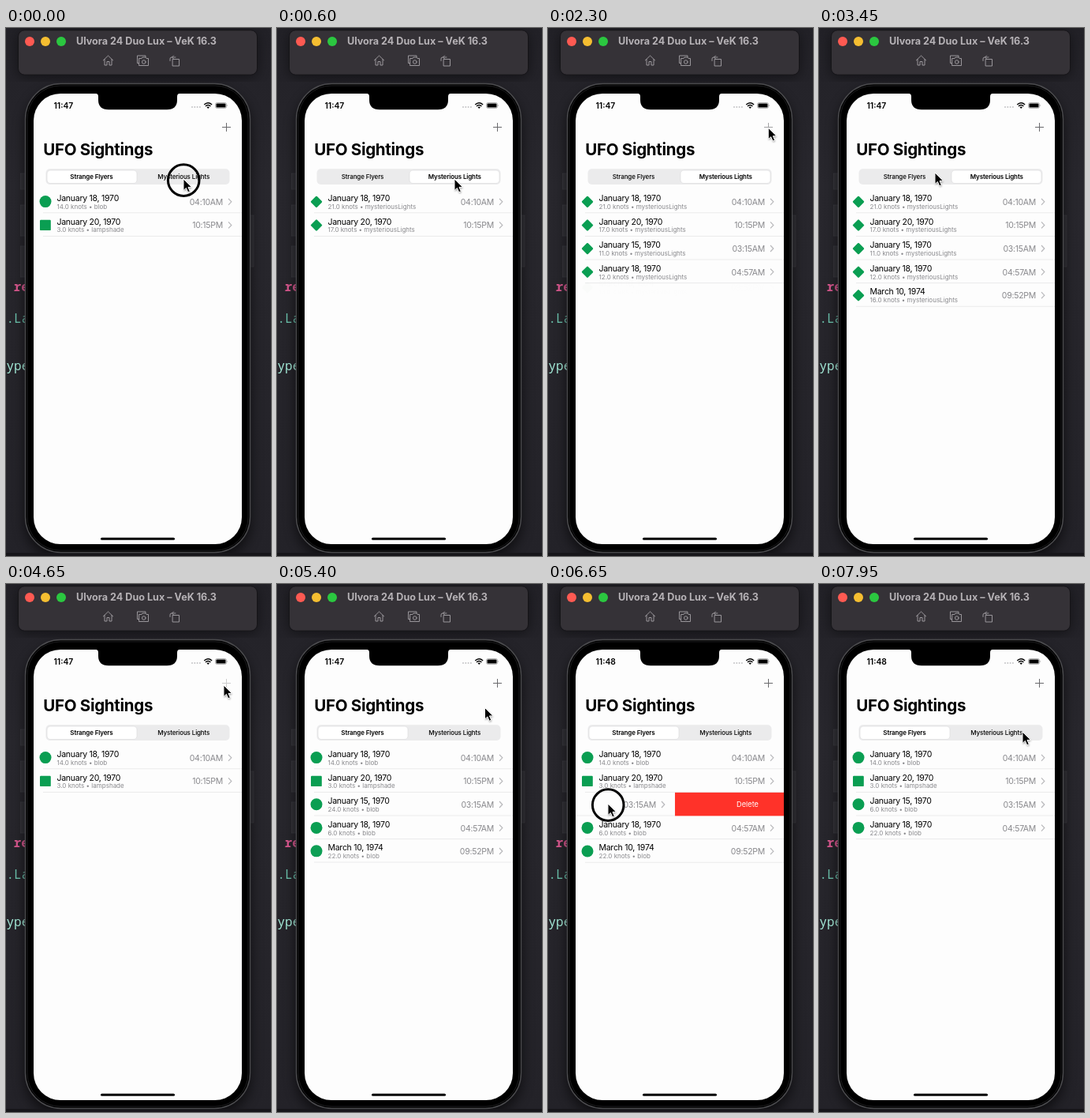
An HTML page for the animation above (8 s loop, 336x668 px).

```html
<!DOCTYPE html>
<html lang="en">
<head>
<meta charset="utf-8">
<title>UFO Sightings</title>
<style>
  html, body { margin: 0; width: 100%; height: 100%; overflow: hidden; background: #25242a; }
  svg { display: block; width: 100%; height: 100%; }
  text { font-family: Inter, Roboto, sans-serif; }
  .code text { font: 500 16px "Noto Sans Mono", "DejaVu Sans Mono", monospace; }
  .code .keyword { font-weight: 700; }
  .icons { fill: none; stroke: #a5a2a6; stroke-width: .9; stroke-linejoin: round; stroke-linecap: round; }
  .body { font-size: 10.5px; letter-spacing: -.26px; }
  .grey { fill: #88888c; }
  .note { font-size: 8px; }
  .tab { font-size: 8px; letter-spacing: -.13px; font-weight: 500; text-anchor: middle; }
  .tab.on { font-weight: 600; }
</style>
</head>
<body>
<svg viewBox="0 0 336 668">
  <defs>
    <linearGradient id="desk" x2="0" y2="1">
      <stop offset="0" stop-color="#222127"/>
      <stop offset=".3" stop-color="#28272d"/>
      <stop offset="1" stop-color="#232228"/>
    </linearGradient>
    <clipPath id="screen"><rect x="35" y="83" width="264" height="570" rx="34"/></clipPath>
    <filter id="blur" x="-20%" width="140%"><feGaussianBlur stdDeviation="8"/></filter>
    <filter id="soft" x="-50%" y="-50%" width="200%" height="200%"><feGaussianBlur stdDeviation="1.200"/></filter>
  </defs>

  <rect width="336" height="668" fill="url(#desk)"/>
  <g fill="#323137" stroke="#3d3c42" stroke-width=".7">
    <rect x="18.500" y="184" width="20" height="20"/>
    <rect x="18.500" y="224" width="20" height="39"/>
    <rect x="18.500" y="276" width="20" height="39"/>
    <rect x="290" y="237" width="24" height="65"/>
  </g>
  <g class="code">
    <text class="keyword" x="9.700" y="333" fill="#d9588f">re</text>
    <text x=".5" y="373" fill="#6cc3ad">.La</text>
    <text x=".5" y="433" fill="#a6eedb">ype</text>
  </g>
  <rect x="24" y="78" width="286" height="594" rx="46" fill="#000" opacity=".6" filter="url(#blur)"/>
  <rect y="664" width="336" height="4" fill="#17161a"/>

  <rect x="15" y="6" width="304" height="56" rx="9" fill="#000" opacity=".45" filter="url(#blur)"/>
  <rect x="15.500" y="2.800" width="303" height="56.400" rx="8" fill="#353237" stroke="#131216" stroke-width=".9"/>
  <circle cx="30" cy="17" r="6" fill="#ff5a52"/>
  <circle cx="50" cy="17" r="6" fill="#f5be31"/>
  <circle cx="70" cy="17" r="6" fill="#2bc740"/>
  <text x="178" y="21" font-size="12.600" font-weight="700" text-anchor="middle" fill="#b6b2b6">Ulvora 24 Duo Lux – VeK 16.3</text>
  <g class="icons">
    <path d="M123.300 41L129.500 35L135.700 41M125 39.500V47H128V42.500H131V47H134V39.500"/>
    <path d="M168.500 44.500H166.500V35H177V36.500"/>
    <path d="M169 38.500H172L173 37H177L178 38.500H180.500V47.500H169Z"/>
    <circle cx="174.800" cy="43" r="2.300"/>
    <path d="M211.500 39.500H219.500V48H211.500ZM208 41.500V39Q208 37 210 37H215M212.500 35L210.500 37L212.500 39"/>
  </g>

  <rect x="24.500" y="70.500" width="285" height="593" rx="45" fill="#000" stroke="#4b4b4e" stroke-width="1.400"/>
  <rect x="27" y="73" width="280" height="588" rx="42" fill="none" stroke="#1c1c1e" stroke-width="1"/>
  <rect x="35" y="83" width="264" height="570" rx="34" fill="#fdfdfd"/>
  <path d="M114 83Q117 83 117 87V91Q117 103.300 130 103.300H204Q217 103.300 217 91V87Q217 83 220 83Z"/>
  <rect x="120" y="644.800" width="94" height="3" rx="1.500"/>
  <g fill="#c4c4c6">
    <circle cx="236" cy="100" r="1"/><circle cx="239.300" cy="100" r="1"/>
    <circle cx="242.600" cy="100" r="1"/><circle cx="245.900" cy="100" r="1"/>
  </g>
  <g fill="none" stroke="#000" stroke-width="1.500">
    <path d="M251.300 97Q256.200 92.500 261.100 97M253 99Q256.200 96 259.400 99"/>
  </g>
  <path d="M254.500 100.200Q256.200 98.800 257.900 100.200L256.200 102Z"/>
  <rect x="265.500" y="94.500" width="14" height="7" rx="2" fill="none" stroke="#999" stroke-width=".7"/>
  <rect x="266.500" y="95.400" width="12" height="5.200" rx="1.200"/>
  <path d="M280.500 96.500Q282 98 280.500 99.500Z" fill="#999"/>
  <text x="47.200" y="161" font-size="20.500" font-weight="700" letter-spacing="-.28">UFO Sightings</text>
  <g id="live"></g>
</svg>

<script>
const LOOP = 8000, ROW = 29.6, RIGHT = 299, WIDTH = 264;
const live = document.getElementById('live');

const when = [['January 18, 1970', '04:10AM'], ['January 20, 1970', '10:15PM'],
  ['January 15, 1970', '03:15AM'], ['January 18, 1970', '04:57AM'], ['March 10, 1974', '09:52PM']];
const sightings = (speeds, shapes) => speeds.map((speed, i) => ({
  date: when[i][0], time: when[i][1], speed, shape: shapes[i] || shapes[0]
}));
const lights = sightings([21, 17, 11, 12, 16], ['mysteriousLights']);
const flyers = sightings([14, 3, 24, 6, 22], ['blob', 'lampshade']);
const flyersAfter = sightings([14, 3, 6, 22], ['blob', 'lampshade']);

// Mouse presses as [down, up] in ms
const lightsTap = [0, 150], flyersTap = [3640, 3750], drag = [6150, 6850];
const lightsAdds = [[1500, 1600], [1800, 1900], [2100, 2200]];
const flyersAdds = [[4480, 4600], [4740, 4850], [4980, 5090]];
const presses = [lightsTap, flyersTap, drag, ...lightsAdds, ...flyersAdds];

// Pointer stops: time, x, y
const path = [[0, 225, 191], [600, 225, 191], [1350, 270, 133], [1480, 280, 126], [2250, 280, 126],
  [3450, 147, 183], [3620, 125, 187], [3800, 125, 187], [4400, 276, 128], [5150, 276, 128],
  [6050, 210, 278], [6180, 210, 278], [6650, 76, 278], [6780, 60, 278], [6950, 60, 278],
  [7600, 258, 187], [LOOP, 258, 187]];

const lerp = (a, b, k) => a + (b - a) * k;
const ease = (t, start, end) => {
  const k = Math.min(1, Math.max(0, (t - start) / (end - start)));
  return k * k * (3 - 2 * k);
};

function pointerAt(t) {
  const i = path.findIndex(p => p[0] > t);
  const [a, b] = [path[i - 1], path[i]];
  const k = ease(t, a[0], b[0]);
  return [lerp(a[1], b[1], k), lerp(a[2], b[2], k)];
}

const icons = {
  blob: '<circle cx="50" cy="0" r="7.5" fill="#0a9e52"/>',
  lampshade: '<rect x="43" y="-6.500" width="13.800" height="13.400" rx="1.200" fill="#0a9e52"/>',
  mysteriousLights: '<rect x="-5.400" y="-5.400" width="10.800" height="10.800" rx="1.200" fill="#0a9e52" transform="translate(50 .3) rotate(45)"/>'
};

const rowSvg = (r, y, opacity = 1, dx = 0) => `
  <g transform="translate(${dx} ${y})" opacity="${opacity}">
    ${icons[r.shape]}
    <text class="body" x="64.500" y="-.7">${r.date}</text>
    <text class="note grey" x="64.500" y="9.300">${r.speed.toFixed(1)} knots • ${r.shape}</text>
    <text class="body grey" x="275" y="4.200" text-anchor="end">${r.time}</text>
    <path d="M282 -3.800L285.800 .2L282 4.200" fill="none" stroke="#b8b8bb" stroke-width="1.200"/>
    <path d="M47 14.200H299" stroke="#e2e2e4" stroke-width=".7"/>
  </g>`;

function listSvg(t, rows, adds) {
  const swipe = t < drag[1]
    ? Math.max(0, 210 - pointerAt(t)[0]) * 1.03
    : lerp(154.5, WIDTH, ease(t, drag[1], 7050));
  const collapse = ease(t, 7050, 7350);
  const deleting = rows === flyers && t >= drag[0];
  return rows.map((r, i) => {
    const shown = i < 2 ? 1 : ease(t, adds[i - 2][1] + 90, adds[i - 2][1] + 330);
    if (!shown) return '';
    const y = 219.6 + ROW * i - 10 * (1 - shown);
    if (!deleting || i < 2) return rowSvg(r, y, shown);
    if (i > 2) return rowSvg(r, y - ROW * collapse);
    const label = lerp(RIGHT - swipe / 3, 63, ease(t, drag[1], 7050));
    const height = ROW * (1 - collapse);
    return rowSvg(r, y, 1 - collapse, -swipe) + (swipe > 0 ? `
      <rect x="${RIGHT - swipe}" y="${y - 15}" width="${swipe}" height="${height}" fill="#ff3229"/>
      <text x="${label}" y="${y + 3}" font-size="9.200" fill="#fff" text-anchor="middle"
        opacity="${Math.min(1, swipe / 60) * (1 - collapse)}">Delete</text>` : '');
  }).join('');
}

function tabsSvg(t, onLights) {
  const slide = ease(t, 150, 400) - ease(t, 3750, 4000);
  return `
    <rect x="50.500" y="178.300" width="233" height="19.600" rx="5" fill="#ebebec"/>
    <rect x="${52 + 116 * slide}" y="180" width="114" height="16.500" rx="4.200" fill="#fff" stroke="#d9d9da" stroke-width=".6"/>
    <text class="tab ${onLights ? '' : 'on'}" x="108.500" y="191">Strange Flyers</text>
    <text class="tab ${onLights ? 'on' : ''}" x="225.300" y="191">Mysterious Lights</text>`;
}

function plusSvg(t) {
  const dim = Math.max(0, ...[...lightsAdds, ...flyersAdds].map(([down, up]) =>
    t < down ? 0 : 1 - ease(t, up, up + 200)));
  return `<path d="M274 125.500H285M279.500 120V131" stroke="#6a6a6d" opacity="${1 - .8 * dim}"/>`;
}

function pointerSvg(t) {
  const [x, y] = pointerAt(t);
  const pressed = presses.some(([down, up]) => t >= down && t < up);
  const arrow = 'M0 0V14.500L3.400 11.400L5.700 16.800L8.300 15.700L6 10.400H10.600Z';
  return `<g transform="translate(${x} ${y})">
    ${pressed ? '<circle cx=".2" cy="1.600" r="19.800" fill="none" stroke="#000" stroke-width="3"/>' : ''}
    <path d="${arrow}" transform="translate(.5 1.500)" opacity=".4" filter="url(#soft)"/>
    <path d="${arrow}" stroke="#fff" stroke-width="1" stroke-linejoin="round"/>
  </g>`;
}

function draw(now) {
  const t = now % LOOP;
  const onLights = t >= lightsTap[1] && t < flyersTap[1];
  const rows = onLights ? lights : t < 7350 ? flyers : flyersAfter;
  live.innerHTML = `
    <text x="60.500" y="101.600" font-size="10.300" font-weight="600">${t < 6400 ? '11:47' : '11:48'}</text>
    ${plusSvg(t)}
    ${tabsSvg(t, onLights)}
    <g clip-path="url(#screen)">${listSvg(t, rows, onLights ? lightsAdds : flyersAdds)}</g>
    ${pointerSvg(t)}`;
}

const start = performance.now();
function tick() {
  draw(performance.now() - start);
  requestAnimationFrame(tick);
}
tick();
</script>
</body>
</html>
```
